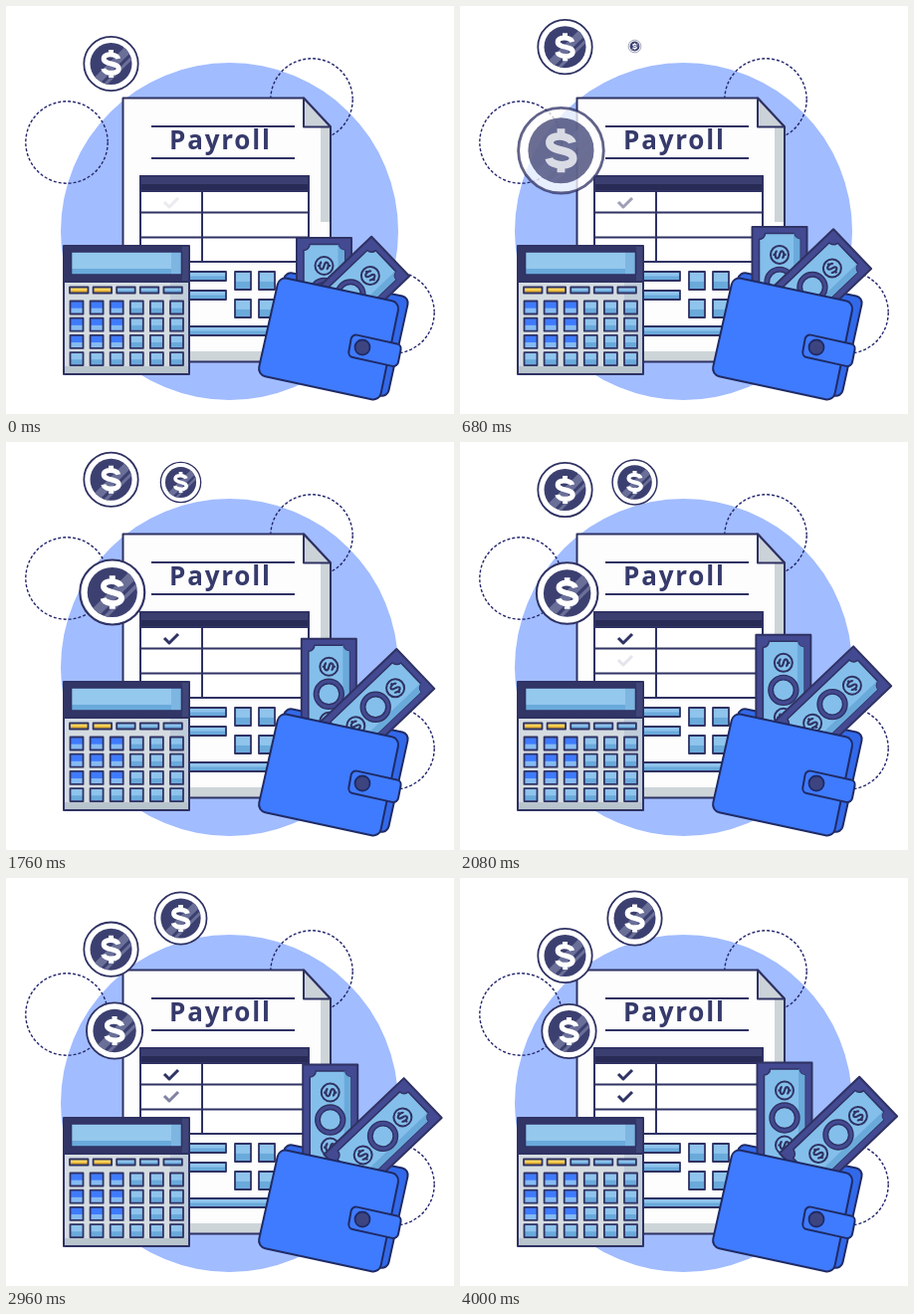
Animation, 450 px wide and 410 px high, one loop 4.04 s. Source, as an HTML page with a canvas:

```html
<!DOCTYPE html>
<html lang="en">
<head>
<meta charset="utf-8">
<title>Payroll</title>
<style>
html, body { margin: 0; width: 100%; height: 100%; overflow: hidden; background: #fff; }
canvas { display: block; }
</style>
</head>
<body>
<canvas id="stage" width="450" height="410"></canvas>
<script>
const ctx = document.getElementById('stage').getContext('2d');
const LOOP = 4040, STEP = 40, END = 4000;
const NAVY = '#2f3263', SKY = '#8fc4ec', MID = '#6aaadb', BLUE = '#3f7bff', NOTE = '#434a92';

const clamp = v => Math.min(1, Math.max(0, v));
const mix = (a, b, p) => a + (b - a) * p;

// Symmetric-value cubic bezier (a, 0, b, 1)
function ease(x, a, b) {
  x = clamp(x);
  let lo = 0, hi = 1, s = x;
  for (let i = 0; i < 24; i++) {
    s = (lo + hi) / 2;
    const r = 1 - s;
    if (3 * s * r * r * a + 3 * s * s * r * b + s * s * s < x) lo = s; else hi = s;
  }
  return s * s * (3 - 2 * s);
}

function paint(fill, stroke, width = 2) {
  if (fill) { ctx.fillStyle = fill; ctx.fill(); }
  if (stroke) { ctx.strokeStyle = stroke; ctx.lineWidth = width; ctx.stroke(); }
}

function box(x, y, w, h, fill, stroke, width) {
  ctx.beginPath();
  ctx.rect(x, y, w, h);
  paint(fill, stroke, width);
}

function disc(x, y, r, fill, stroke, width) {
  ctx.beginPath();
  ctx.arc(x, y, r, 0, Math.PI * 2);
  paint(fill, stroke, width);
}

function poly(pts, fill, stroke, width) {
  ctx.beginPath();
  pts.forEach(([x, y], i) => i ? ctx.lineTo(x, y) : ctx.moveTo(x, y));
  ctx.closePath();
  paint(fill, stroke, width);
}

function roundPoly(pts, r, fill, stroke, width) {
  const n = pts.length, a = pts[n - 1], b = pts[0];
  ctx.beginPath();
  ctx.moveTo((a[0] + b[0]) / 2, (a[1] + b[1]) / 2);
  pts.forEach((p, i) => ctx.arcTo(...p, ...pts[(i + 1) % n], r));
  ctx.closePath();
  paint(fill, stroke, width);
}

function line(x1, y1, x2, y2, color = NAVY, width = 2) {
  ctx.beginPath();
  ctx.moveTo(x1, y1);
  ctx.lineTo(x2, y2);
  paint(null, color, width);
}

function dashed(x, y) {
  ctx.setLineDash([3, 2]);
  disc(x, y, 41.2, null, '#25286e', 1.4);
  ctx.setLineDash([]);
}

function dollar(color, width = 5) {
  ctx.beginPath();
  ctx.moveTo(7.2, -5);
  ctx.bezierCurveTo(6, -10, -7.3, -11, -7.3, -5);
  ctx.bezierCurveTo(-7.3, 1.3, 7.7, -1.3, 7.7, 5);
  ctx.bezierCurveTo(7.7, 11, -6.5, 10.5, -7.7, 5);
  ctx.moveTo(0, -14);
  ctx.lineTo(0, -9);
  ctx.moveTo(0, 9);
  ctx.lineTo(0, 14);
  paint(null, color, width);
}

function coin(x, y, r, alpha = 1) {
  if (r < 0.3 || alpha <= 0) return;
  ctx.save();
  ctx.globalAlpha = alpha;
  ctx.translate(x, y);
  ctx.scale(r / 28, r / 28);
  disc(0, 0, 27.2, '#fff', NAVY, 1.8);
  disc(0, 0, 21, '#3c4070');
  ctx.save();
  ctx.clip();
  ctx.rotate(Math.PI / 4);
  box(-2, -24, 8, 48, '#6a6f98');
  box(9, -24, 3, 48, '#6a6f98');
  ctx.restore();
  dollar('#fff');
  ctx.restore();
}

function tick(y, alpha) {
  ctx.save();
  ctx.globalAlpha = clamp(alpha);
  ctx.beginPath();
  ctx.moveTo(159, y - 1);
  ctx.lineTo(164, y + 4);
  ctx.lineTo(173, y - 5);
  paint(null, NAVY, 3);
  ctx.restore();
}

function sheet() {
  poly([[117.5, 92.5], [299, 92.5], [326, 121.5], [326, 357.5], [117.5, 357.5]], '#fdfdfe');
  box(316, 121, 10, 96, '#cdd5d9');
  box(118, 347, 208, 10, '#cdd5d9');
  poly([[117.5, 92.5], [299, 92.5], [326, 121.5], [326, 357.5], [117.5, 357.5]], null, NAVY);
  poly([[299, 92.5], [326, 121.5], [299, 121.5]], '#cbd3d8', NAVY);

  line(146, 121, 290, 121);
  line(146, 153, 290, 153);
  ctx.fillStyle = '#363a6b';
  ctx.font = '700 26px "Open Sans", "Noto Sans", sans-serif';
  ctx.letterSpacing = '1.8px';
  ctx.textAlign = 'left';
  ctx.fillText('Payroll', 164, 143.5);

  box(135, 171, 169, 86, '#fff', NAVY);
  box(135, 171, 169, 15, '#3b3f70');
  box(135, 179, 169, 7, '#282b55');
  box(135, 171, 169, 15, null, NAVY);
  line(135, 207.5, 304, 207.5);
  line(135, 232.5, 304, 232.5);
  line(197, 186, 197, 257);

  for (const [y, end] of [[267, 221], [286, 221], [322, 275]]) {
    box(170, y, end - 170, 9, SKY);
    box(170, y + 4.5, end - 170, 4.5, MID);
    box(170, y, end - 170, 9, null, NAVY, 1.8);
  }
  for (const x of [230, 254]) for (const y of [267, 295]) key(x, y, 16, 18, SKY, MID);
}

function key(x, y, w, h, top, low) {
  box(x, y, w, h, top);
  box(x, y + h * 0.55, w, h * 0.45, low);
  box(x, y, w, h, null, NAVY, 1.8);
}

function calculator() {
  box(58, 241, 126, 129, '#d5dce1');
  box(165, 277, 19, 93, '#c0cdd9');
  box(58, 362, 126, 8, '#b9c5cd');
  box(58, 241, 126, 36, '#323666');
  box(177, 241, 7, 36, '#3f4679');
  box(65.5, 247, 111, 23, '#95c8ed');
  box(66, 264, 110, 6, MID);
  box(166, 247, 10, 23, '#7eb6e2');
  box(65.5, 247, 111, 23, null, NAVY, 1.6);
  line(58, 277, 184, 277);
  box(58, 241, 126, 129, null, NAVY);

  for (let i = 0; i < 5; i++) {
    const gold = i < 2;
    key(64 + i * 23.6, 282.5, 18.5, 6, gold ? '#ffd75a' : SKY, gold ? '#e0ac32' : MID);
  }
  for (let row = 0; row < 4; row++) {
    for (let col = 0; col < 6; col++) {
      const vivid = col < 3 && row < 3;
      key(64.5 + col * 20.1, 296.5 + row * 17.2, 13, 13, vivid ? BLUE : SKY, vivid ? '#86bbf2' : MID);
    }
  }
}

function banknote(x, y, angle) {
  ctx.save();
  ctx.translate(x, y);
  ctx.rotate(angle);
  box(-27.5, -55.5, 55, 111, NOTE, NAVY);
  const w = 20.5, h = 49, c = 6, pi = Math.PI;
  ctx.beginPath();
  ctx.arc(-w, -h, c, pi / 2, 0, true);
  ctx.arc(w, -h, c, pi, pi / 2, true);
  ctx.arc(w, h, c, -pi / 2, pi, true);
  ctx.arc(-w, h, c, 0, -pi / 2, true);
  ctx.closePath();
  paint('#84bfeb', NAVY, 1.5);
  ctx.save();
  ctx.clip();
  box(14, -h, 8, h * 2, MID);
  ctx.restore();
  disc(0, 0, 15, NOTE, NAVY, 1.4);
  disc(0, 0, 10.5, '#84bfeb', NAVY, 1.4);
  for (const dy of [-27.5, 27.5]) {
    ctx.save();
    ctx.translate(0, dy);
    disc(0, 0, 9, '#84bfeb', NAVY, 2);
    ctx.rotate(pi / 2);
    ctx.scale(0.47, 0.47);
    dollar(NAVY, 4.6);
    ctx.restore();
  }
  ctx.restore();
}

function wallet(q) {
  const edge = '#1f2b66';
  roundPoly([[281, 267], [405, 293], [383, 393], [258, 368]], 7, '#3269ea', edge);
  const back = 1 - q;
  banknote(326 - 6.5 * back, 241 + 47.5 * back, 0);
  banknote(380 - 34 * back, 258 + 32 * back, Math.PI * 46.3 / 180);
  roundPoly([[274.5, 272], [395.5, 298], [375, 397], [252.5, 370.5]], 8, BLUE, edge);
  roundPoly([[347.5, 329.5], [397.5, 340.5], [393, 363], [343.5, 352]], 5, BLUE, edge);
  disc(358, 343, 7.5, '#3d447f', edge, 1.8);
}

function draw(t) {
  const q = ease(t / END, 0.215, 0.215);
  ctx.fillStyle = '#fff';
  ctx.fillRect(0, 0, 450, 410);
  ctx.lineJoin = 'round';

  disc(224.5, 226.5, 169.5, '#a1bcff');
  dashed(61, 137);
  dashed(307, 94);
  dashed(389, 308);
  sheet();
  tick(198, 0.1 + t / 1850);
  tick(220, (t - 1840) / 1860);
  calculator();
  wallet(q);

  const turn = 1450;
  const lift = 1 - (1 - clamp(t / turn)) ** 2;
  const y = t < turn ? mix(58, 34.5, lift) : mix(34.5, 78, ease((t - turn) / (END - turn), 0.28, 0.28));
  coin(105.5, y, 28);
  coin(175.5, 40.5, 28 * q);
  coin(mix(99, 109.5, q), mix(142.5, 154, q), mix(49, 28, q), clamp(t / 900));
}

const start = performance.now();
function frame() {
  const t = (performance.now() - start) % LOOP;
  draw(Math.floor(t / STEP) * STEP);
  requestAnimationFrame(frame);
}
frame();
</script>
</body>
</html>
```
